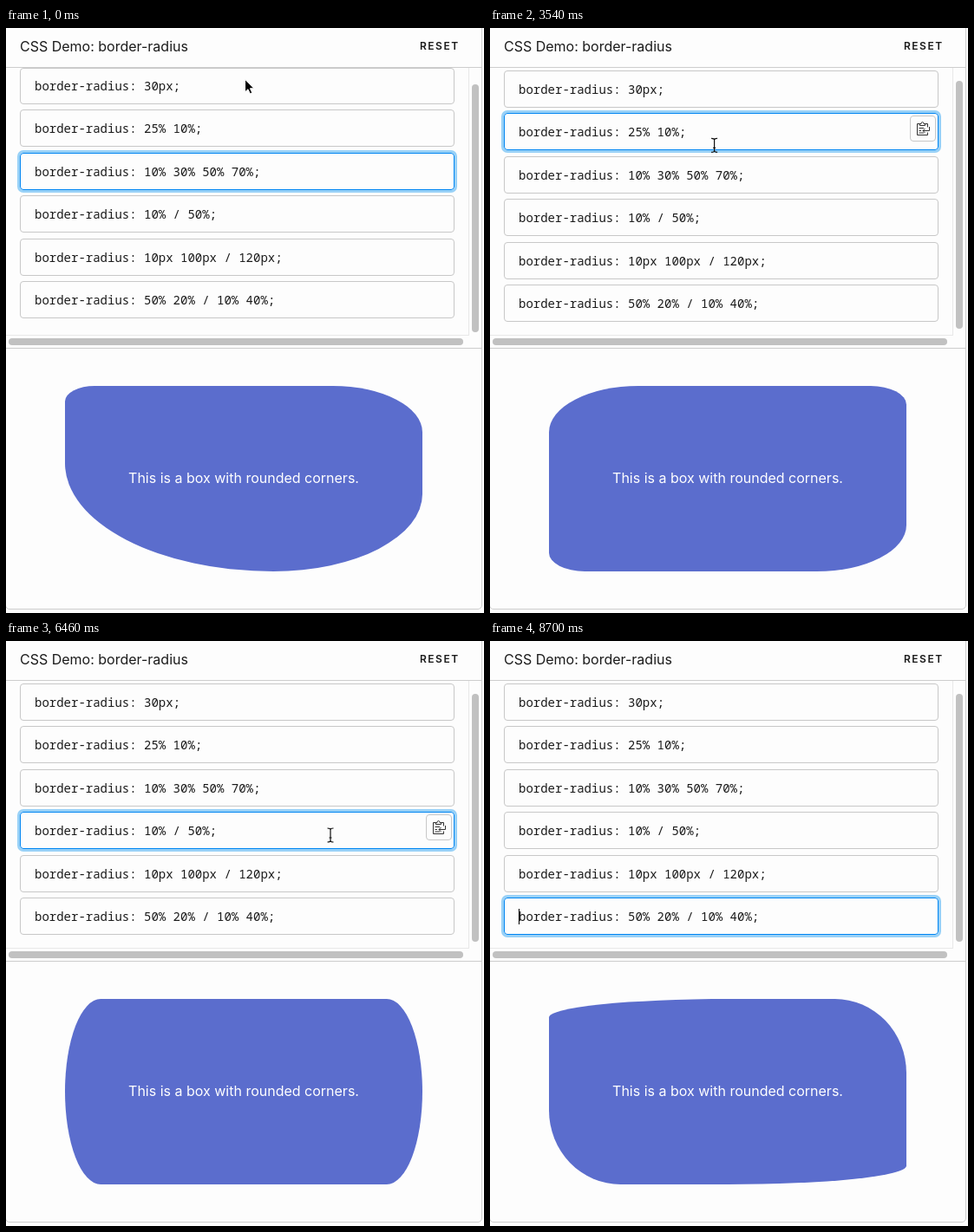
Animation of 551x675 px, one loop 8930 ms. Source, as an HTML page:

```html
<!DOCTYPE html>
<html lang="en">
<head>
<meta charset="utf-8">
<title>border-radius demo</title>
<style>
  html, body { margin: 0; width: 100%; height: 100%; overflow: hidden; background: #fdfdfd; }
  body { position: relative; color: #1b1b1b; font: 16px Inter, sans-serif; }
  body *, .row * { position: absolute; box-sizing: border-box; }
  #panel { left: -1px; top: -6px; width: 550px; height: 677px; border: 1px solid #cdcdcd; border-radius: 5px; }
  h1 { left: 16px; top: 0; margin: 0; font: 16px/43px Inter, sans-serif; white-space: nowrap; }
  #reset { left: 477px; top: 0; font-size: 12px; font-weight: 600; line-height: 42px; letter-spacing: 1.5px; }
  .line { left: 0; width: 548px; height: 1px; background: #cdcdcd; }
  .thumb { background: #c1c1c1; border-radius: 4px; }
  #list { left: 0; top: 46px; width: 533px; height: 308px; overflow: hidden; }
  .row { left: 16px; width: 501px; border: 1px solid #c8c8c8; border-radius: 4px; }
  .row.focus { box-shadow: 0 0 0 3px #98d1f7; }
  .row span { left: 16px; bottom: 0; font: 14px/41px "Noto Sans Mono", monospace; white-space: pre; }
  .row i { bottom: 11px; width: 1px; height: 18px; background: #000; }
  .row button { right: 2px; bottom: 9px; width: 30px; height: 30px; padding: 0; background: #fdfdfd; border: 1px solid #c8c8c8; border-radius: 4px; }
  .row svg { left: 6px; top: 6px; }
  #box { left: 68px; top: 413px; width: 412px; height: 214px; background: #5b6dcd; color: #fff; text-align: center; line-height: 213px; white-space: nowrap; }
  #cursor { left: 0; top: 0; width: 551px; height: 675px; }
</style>
</head>
<body>
<div id="panel"></div>
<h1>CSS Demo: border-radius</h1>
<div id="reset">RESET</div>
<div class="line" style="top:45px"></div>
<div id="list"></div>
<div style="left:533px;top:46px;width:1px;height:309px;background:#e8e8e8"></div>
<div style="left:0;top:354px;width:534px;height:1px;background:#e8e8e8"></div>
<div class="thumb" id="thumb" style="left:537px;width:8px;height:286px"></div>
<div class="thumb" style="left:3px;top:358px;width:524px;height:8px"></div>
<div class="line" style="top:369px"></div>
<div id="box">This is a box with rounded corners.</div>
<svg id="cursor"><path id="pointer" stroke-linejoin="round"/></svg>
<script>
const LOOP = 8930, STEP = LOOP / 76, FADE = 300, BLINK = 480;
const $ = id => document.getElementById(id);
const values = ['30px', '25% 10%', '10% 30% 50% 70%', '10% / 50%', '10px 100px / 120px', '50% 20% / 10% 40%'];

// time, row, caret column
const clicks = [[-1000, 2, 30], [1280, 0, 20], [2690, 1, 23], [3970, 2, 31], [5590, 3, 25], [6640, 4, 34], [7740, 5, 0]];
// time, x, y
const path = [
  [0, 277, 59], [230, 244, 67], [940, 244, 67], [1300, 212, 61], [1830, 212, 61], [2350, 229, 119],
  [3350, 229, 120], [3950, 325, 170], [4300, 325, 170], [4940, 374, 224], [6400, 374, 224],
  [6640, 382, 269], [7180, 382, 269], [7640, 390, 316], [8000, 390, 316], [8230, 405, 671], [8450, 472, 682]
];
const scrollKeys = [[1830, 0], [2130, 4]];

const shapes = {
  arrow: ['M0 0V14.5L3.4 11.4 5.8 16.5 8.2 15.4 5.9 10.4H10.4Z', '#000', '#fff', 1],
  hand: ['M0 0C1 0 1.5.7 1.5 1.6V6.5C1.8 5.7 3.9 5.7 4.2 6.9 4.7 6.2 6.4 6.4 6.7 7.6 7.5 7 9 7.5 9 8.8V11.8C9 13.8 7.5 14.8 7.5 17H1C.7 15-2.2 13-4.4 10-5.2 8.8-3.8 7.4-2.4 8.4L-1.4 9.3V1.5C-1.4.5-.9 0 0 0ZM1.8 10.5V14M4 10.5V14M6.2 10.5V14', '#fff', '#000', 1.1],
  beam: ['M-3.5-8Q0-8 0-6.2 0-8 3.5-8M0-6.5V6.5M-3.5 8Q0 8 0 6.2 0 8 3.5 8M-1.5 3H1.5', 'none', '#111', 1.2]
};

const mix = (a, b, p) => a + (b - a) * p;
const clamp = p => Math.min(1, Math.max(0, p));

function bezier(x1, y1, x2, y2, x) {
  const at = (a, b, s) => 3 * a * s * (1 - s) ** 2 + 3 * b * s * s * (1 - s) + s ** 3;
  let lo = 0, hi = 1;
  for (let i = 0; i < 24; i++) {
    const mid = (lo + hi) / 2;
    if (at(x1, x2, mid) < x) lo = mid; else hi = mid;
  }
  return at(y1, y2, lo);
}
const easeIn = x => bezier(.42, 0, 1, 1, x);
const ease = x => bezier(.25, .1, .25, 1, x);

function track(keys, t) {
  const i = keys.findIndex(k => k[0] > t);
  if (i < 0) return keys[keys.length - 1].slice(1);
  if (!i) return keys[0].slice(1);
  const a = keys[i - 1], b = keys[i], p = (t - a[0]) / (b[0] - a[0]);
  return a.slice(1).map((v, k) => mix(v, b[k + 1], p));
}

// Four horizontal then four vertical radii in pixels
function radii(value) {
  const sides = value.split(' / ');
  return [412, 214].flatMap((size, k) => {
    const n = (sides[k] || sides[0]).split(' ').map(s => s.endsWith('%') ? parseFloat(s) / 100 * size : parseFloat(s));
    return [0, 1, 2, 3].map(i => n[i % n.length]);
  });
}
const corners = values.map(radii);

const rows = values.map(value => {
  const el = document.createElement('div');
  el.className = 'row';
  el.innerHTML = `<span>border-radius: ${value};</span><i></i><button><svg width="16" height="16" fill="none" stroke="#333"><path d="M4.5 2.5H1.5V15.5H13.5V12.5M10.5 2.5H13.5V6.5M4.5 4.5V2.5H6Q6 .5 7.5.5T9 2.5H10.5V4.5ZM3.5 7.5H9M3.5 10.5H6M3.5 13H9M15.5 6V10.5H8M10.5 8L8 10.5 10.5 13"/></svg></button>`;
  $('list').append(el);
  return { el, caret: el.querySelector('i'), button: el.querySelector('button') };
});

function draw(t) {
  const n = clicks.filter(c => c[0] <= t).length - 1;
  const [since, focus, column] = clicks[n];
  const previous = clicks[Math.max(0, n - 1)][1];
  const progress = clamp((t - since) / FADE);
  const scroll = Math.round(track(scrollKeys, t)[0]);
  const [x, y] = track(path, t);
  const caretOn = n ? Math.floor((t - since) / BLINK) % 2 === 0 : t > 700 && t < 1190;
  let kind = 'arrow';

  rows.forEach(({ el, caret, button }, i) => {
    const edge = Math.floor(45 + 49.5 * i) + scroll, top = Math.max(46, edge);
    const hover = t > 940 && x < 517 && y >= edge && y < edge + 43;
    const focused = i === focus;
    let color = '#c8c8c8';
    if (focused) color = '#0085f2';
    else if (hover) color = '#555';
    else if (n && i === previous) {
      const p = ease(progress);
      color = `rgb(${mix(0, 200, p)},${mix(133, 200, p)},${mix(242, 200, p)})`;
    }
    if (hover) kind = focused ? 'beam' : 'hand';
    el.className = focused ? 'row focus' : 'row';
    el.style.top = top - 46 + 'px';
    el.style.height = edge + 43 - top + 'px';
    el.style.borderColor = color;
    caret.style.left = Math.floor(16 + 8.4 * column) + 'px';
    caret.style.display = focused && caretOn ? '' : 'none';
    button.style.display = hover ? '' : 'none';
  });

  $('thumb').style.top = 65 - scroll + 'px';
  const p = easeIn(progress);
  const r = corners[previous].map((v, i) => mix(v, corners[focus][i], p) + 'px');
  $('box').style.borderRadius = r.slice(0, 4).join(' ') + ' / ' + r.slice(4).join(' ');

  const [d, fill, stroke, width] = shapes[kind];
  const attrs = { d, fill, stroke, 'stroke-width': width, transform: `translate(${x} ${y})` };
  for (const key in attrs) $('pointer').setAttribute(key, attrs[key]);
}

const start = performance.now();
function tick() {
  const t = (performance.now() - start) % LOOP;
  draw(Math.floor(t / STEP) * STEP + 10);
  requestAnimationFrame(tick);
}
tick();
</script>
</body>
</html>
```
